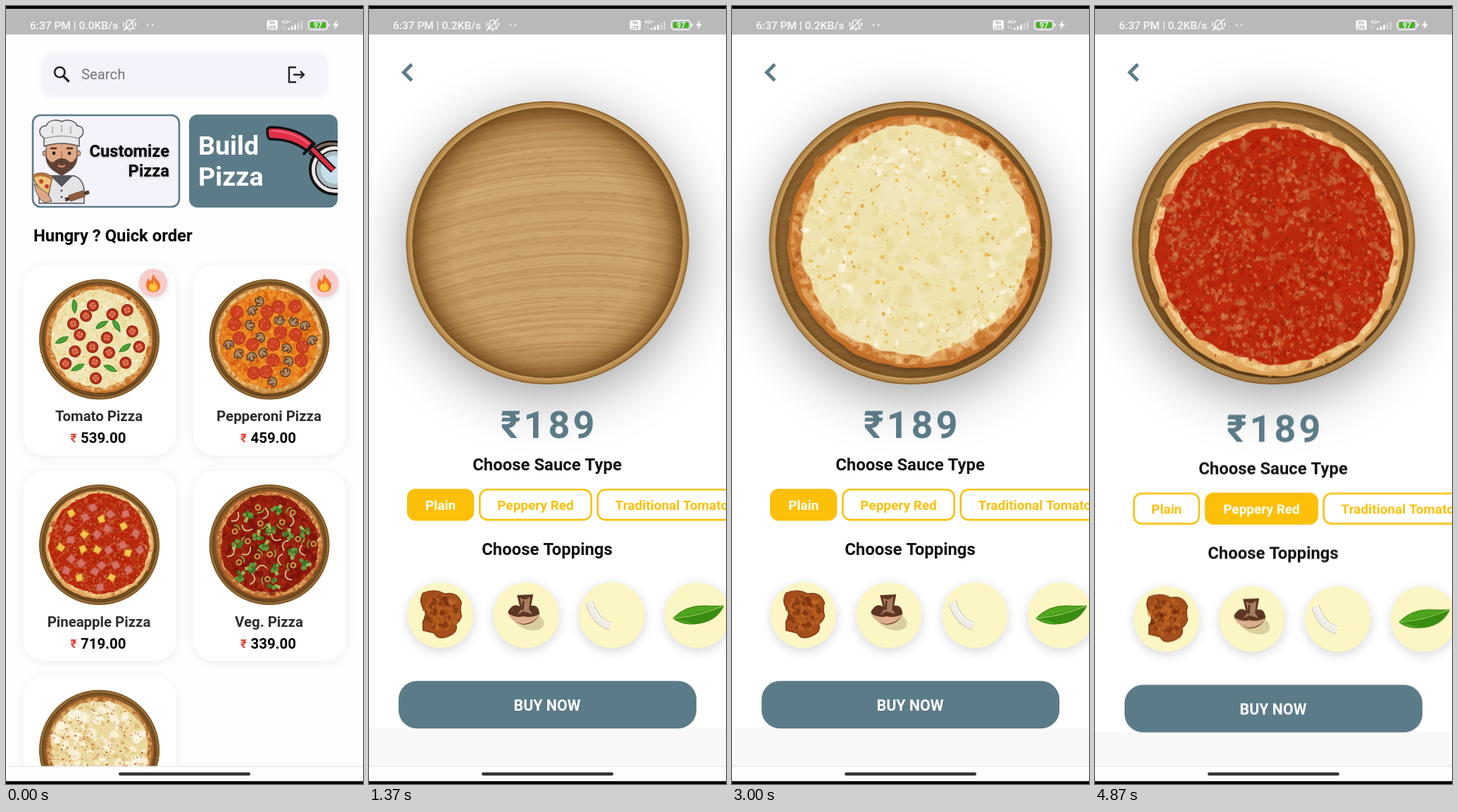
An HTML page with a canvas for the animation above (4990 ms loop, 507 by 1104 pixels).

```html
<!DOCTYPE html>
<html lang="en">
<head>
<meta charset="utf-8">
<style>
html, body { margin: 0; width: 100%; height: 100%; overflow: hidden; background: #000; }
canvas { display: block; }
</style>
</head>
<body>
<canvas id="stage" width="507" height="1104"></canvas>
<script>
const W = 507, H = 1104, LOOP = 4990, STEP = LOOP / 40, TAU = Math.PI * 2;
const SLATE = '#5c7b89', AMBER = '#fcc00a', LILAC = '#f4f3fb';
const stage = document.getElementById('stage').getContext('2d');
let g = stage;

let seed = 7;
const rnd = () => (seed = (seed * 16807) % 2147483647) / 2147483647;
const clamp = v => Math.min(1, Math.max(0, v));

// ---------- drawing helpers ----------
function layer(w, h, draw) {
  const c = document.createElement('canvas'), outer = g;
  c.width = w; c.height = h;
  g = c.getContext('2d');
  draw();
  g = outer;
  return c;
}
function at(x, y, scale, draw) {
  g.save(); g.translate(x, y); g.scale(scale, scale); draw(); g.restore();
}
function paint(fill, stroke, width) {
  if (fill) { g.fillStyle = fill; g.fill(); }
  if (stroke) { g.shadowColor = 'transparent'; g.strokeStyle = stroke; g.lineWidth = width; g.stroke(); }
}
function shaded(color, blur, dy, draw) {
  g.save(); g.shadowColor = color; g.shadowBlur = blur; g.shadowOffsetY = dy; draw(); g.restore();
}
function rect(x, y, w, h, r, fill, stroke, width) {
  g.beginPath(); g.roundRect(x, y, w, h, r); paint(fill, stroke, width);
}
function oval(x, y, rx, ry, fill, stroke, width, turn = 0) {
  g.beginPath(); g.ellipse(x, y, rx, ry, turn, 0, TAU); paint(fill, stroke, width);
}
const disc = (x, y, r, fill, stroke, width) => oval(x, y, r, r, fill, stroke, width);
function shape(d, fill, stroke, width) {
  const p = new Path2D(d);
  if (fill) { g.fillStyle = fill; g.fill(p); }
  if (stroke) { g.strokeStyle = stroke; g.lineWidth = width; g.stroke(p); }
}
function text(s, x, y, size, color, align = 'center', weight = 700, spacing = 0) {
  g.font = `${weight} ${size}px Roboto, sans-serif`;
  g.letterSpacing = spacing + 'px';
  g.textAlign = align; g.fillStyle = color; g.fillText(s, x, y);
}
function blob(x, y, r, wobble, fill) {
  const p = rnd() * 6, q = rnd() * 6;
  g.beginPath();
  for (let a = 0; a < TAU; a += 0.04) {
    const d = r * (1 + wobble * (Math.sin(3 * a + p) + Math.sin(8 * a + q) + 0.6 * Math.sin(17 * a + p) + 0.5 * Math.sin(31 * a)));
    g.lineTo(x + d * Math.cos(a), y + d * Math.sin(a));
  }
  g.closePath(); paint(fill);
}
function specks(n, inner, outer, size, color) {
  for (let i = 0; i < n; i++) {
    const a = rnd() * TAU, d = Math.sqrt(inner * inner + rnd() * (outer * outer - inner * inner));
    const r = size * (0.4 + rnd() * 0.8);
    oval(d * Math.cos(a), d * Math.sin(a), r, r * (0.4 + rnd() * 0.5), color, 0, 0, rnd() * 3);
  }
}
// Even spread over a disc, with a little jitter.
function spread(n, radius, turn, draw) {
  for (let i = 0; i < n; i++) {
    const d = radius * Math.sqrt((i + 0.5) / n), a = i * 2.4 + turn;
    const x = d * Math.cos(a) + rnd() * 6 - 3, y = d * Math.sin(a) + rnd() * 6 - 3;
    g.save(); g.translate(x, y); g.rotate(rnd() * TAU); draw(i); g.restore();
  }
}

// ---------- food ----------
const tray = layer(404, 404, () => {
  g.translate(202, 202);
  g.beginPath(); g.arc(0, 0, 201, 0, TAU); g.clip();
  disc(0, 0, 201, '#c8a069');
  for (let y = -240; y < 250; y += 2.4) {
    const w = rnd() * 10;
    g.globalAlpha = 0.06 + rnd() * 0.22;
    shape(`M-200 ${y + 34}C-90 ${y - 16 + w} 60 ${y - 30 - w} 200 ${y + 8}`,
      0, rnd() < 0.6 ? '#a2743a' : '#dfbd89', 1 + rnd() * 2);
  }
  for (let i = 0; i < 320; i++) {
    const x = rnd() * 380 - 190, y = rnd() * 380 - 190;
    g.globalAlpha = 0.35;
    shape(`M${x} ${y}l${5 + rnd() * 8} -1.5`, 0, '#8f6230', 0.8);
  }
  g.globalAlpha = 1;
  const bevel = g.createRadialGradient(0, 4, 135, 0, 0, 192);
  bevel.addColorStop(0, 'rgba(120,72,16,0)');
  bevel.addColorStop(0.55, 'rgba(115,68,14,.25)');
  bevel.addColorStop(0.9, 'rgba(95,54,10,.62)');
  bevel.addColorStop(1, 'rgba(85,48,8,.75)');
  disc(0, 0, 192, bevel);
  disc(0, 0, 196.5, 0, '#b5884a', 9);
  disc(0, 0, 194, 0, '#c69d60', 2.5);
  disc(0, 0, 200, 0, '#8d6532', 2);
});

function makePizza(crust, toast, base, baseRadius, spots) {
  return layer(404, 404, () => {
    g.translate(202, 202);
    shaded('rgba(40,20,0,.75)', 12, 3, () => blob(0, 0, 180, 0.005, toast));
    blob(1, -1, 175, 0.006, crust);
    specks(190, 160, 176, 8, toast + '99');
    specks(110, 158, 172, 5, '#f3cf9066');
    specks(34, 160, 175, 4.5, '#9c441288');
    blob(0, -2, baseRadius, 0.013, base);
    for (const [n, size, color, inner = 0] of spots) specks(n, inner, baseRadius - 3, size, color);
  });
}
const cheesy = makePizza('#dfa05a', '#c4712b', '#eee2ae', 162, [
  [150, 15, 'rgba(243,234,196,.5)'], [140, 10, 'rgba(230,213,142,.4)'], [60, 6, 'rgba(253,250,236,.6)', 95],
  [230, 2, 'rgba(232,196,90,.55)'], [120, 2.8, 'rgba(236,182,56,.85)'], [70, 2.4, 'rgba(220,145,35,.8)', 90]]);
const flaked = makePizza('#dca562', '#a8662a', '#ebd9a0', 162, [
  [120, 17, 'rgba(252,247,228,.7)'], [90, 9, 'rgba(222,178,100,.5)'],
  [150, 3.5, 'rgba(196,92,36,.75)'], [70, 3, 'rgba(140,44,18,.8)']]);
const peppery = makePizza('#f0cc90', '#dfa45a', '#b8280c', 166, [
  [240, 12, 'rgba(192,44,14,.6)'], [420, 6, 'rgba(196,106,58,.5)'], [620, 3.6, 'rgba(212,142,86,.5)'],
  [420, 5, 'rgba(176,26,6,.65)'], [260, 2.4, 'rgba(226,96,50,.6)'], [260, 2, 'rgba(96,38,16,.6)']]);
const orange = makePizza('#ecc07c', '#c98a3e', '#e27a1d', 165, [
  [170, 14, 'rgba(240,148,40,.6)'], [200, 9, 'rgba(209,78,18,.5)'], [170, 5, 'rgba(247,178,70,.6)']]);
const dark = makePizza('#d99a58', '#b06028', '#97200f', 163, [
  [180, 13, 'rgba(122,18,10,.6)'], [220, 6, 'rgba(190,60,35,.5)']]);

const toppings = {
  tomato(i) {
    if (i % 3 == 2) return shape('M-10 0Q-2 -8 10 0Q0 6 -10 0Z', '#4aa335', '#2f7a22', 1);
    disc(0, 0, 8, '#b3301f', '#8f2416', 1.2);
    disc(0, 0, 5, '#d0583a');
    for (let k = 0; k < 4; k++) disc(3.2 * Math.cos(k * 1.57), 3.2 * Math.sin(k * 1.57), 1, '#eeb070');
  },
  pepperoni(i) {
    if (i % 2) return shape('M-7 1Q-6 -7 1 -7Q8 -6 7 2Q4 3 3 -1L2 5L-3 5L-3 0Q-5 4 -7 1Z', '#b08a66', '#5d3c24', 1.5);
    disc(0, 0, 9, '#cb4020', '#b5331b', 1);
    specks(10, 0, 7, 1.4, '#e2684a');
  },
  pineapple(i) {
    if (i % 3 == 0) return shape('M-5 -4L5 -5L6 3L-2 5Z', '#f0c550', '#d99a26', 1);
    shape('M-6 -5L4 -5L6 4L-4 6Z', '#d27266', '#b9493c', 1);
  },
  veg(i) {
    if (i % 3 == 0) {
      shape('M-2 0L2 0L4 8L-1 9Z', '#9cb95a');
      for (let k = 0; k < 7; k++) disc(rnd() * 13 - 6, rnd() * 8 - 6, 2.8, k % 2 ? '#3f7a2a' : '#649a3c');
    } else if (i % 3 == 1) shape('M-8 3Q0 -9 8 2', 0, '#d8cf9c', 1.7);
    else { disc(0, 0, 3.4, 0, '#bfa447', 2); shape('M5 -8Q10 -3 7 3', 0, '#7fae3c', 1.8); }
  }
};

function chicken() {
  shape('M-25 -31Q-8 -38 6 -30Q24 -34 30 -17Q27 -10 30 2Q27 10 22 13Q26 25 10 31Q-4 36 -9 26L-25 22L-25 9Q-20 4 -22 -6Q-32 -18 -25 -31Z', '#a34e1b', '#7a3512', 1.2);
  g.save(); g.translate(0, -3); specks(60, 0, 25, 5, 'rgba(196,106,36,.5)'); specks(34, 0, 25, 4, 'rgba(105,38,10,.45)'); g.restore();
}
function mushroom() {
  oval(4, 8, 22, 13, 'rgba(120,90,50,.25)', 0, 0, 0.3);
  shape('M-26 -4Q-19 -18 -9 -12L-13 -28L10 -29L7 -13Q18 -15 19 -1Q13 13 -4 14Q-20 11 -26 -4Z', '#5c3524');
  shape('M-26 -2Q-14 5 -4 2Q7 5 19 -1Q13 11 -4 13Q-20 11 -26 -2Z', '#dcae8b');
  shape('M-9 -25Q-3 -18 6 -26L4 -8L9 -1L-4 -5L-13 0L-6 -9Z', '#a87c60');
  shape('M-4 -20L-5 -7', 0, '#5c3524', 3);
}
function onion() {
  shape('M-32 -18Q-24 10 -2 16', 0, '#d5d2c6', 12);
  shape('M-32 -18Q-24 10 -2 16', 0, '#efede5', 9);
  shape('M-29 -18Q-21 7 0 13', 0, '#fbfaf6', 2);
}
function leaf() {
  shape('M-35 5Q-18 -13 8 -13Q28 -12 37 -13Q27 11 -6 13Q-22 14 -35 5Z', '#4fa51d', '#34790f', 1);
  shape('M-35 5Q-15 8 -6 13Q25 12 37 -13Q5 -3 -35 5Z', '#398c12');
  shape('M-35 5Q2 2 37 -13', 0, '#a4cf62', 1.2);
}

// ---------- home screen ----------
function chef() {
  const ink = '#56545a';
  shape('M47 280V262Q48 246 62 241H97Q110 246 111 262V280Z', '#e4e4e7', ink, 1.5);
  shape('M64 241L79 256L94 241Z', '#55575c', ink, 1.2);
  disc(79, 262, 1.6, ink); disc(79, 271, 1.6, ink);
  disc(56, 209, 4, '#d9a27c', ink, 1); disc(102, 209, 4, '#d9a27c', ink, 1);
  shape('M57 194H101V216Q99 233 79 238Q59 233 57 216Z', '#dfa883', ink, 1.2);
  shape('M57 212Q62 224 68 221Q79 211 90 221Q96 224 101 212Q102 229 79 241Q56 229 57 212Z', '#5f4235');
  shape('M74 226Q79 230 84 226', 0, '#d98677', 2.5);
  shape('M63 202h9M86 202h9', 0, '#4b2d22', 2.5);
  disc(68, 209, 2.4, '#2d2220'); disc(90, 209, 2.4, '#2d2220');
  shape('M79 206V215', 0, '#b97d5b', 2);
  shape('M54 187C45 183 46 170 57 170C61 160 74 161 79 164C86 160 98 162 101 170C112 170 112 183 104 187L104 199Q79 191 54 199Z', '#e9e9eb', ink, 1.5);
  shape('M54 188Q79 181 104 188M66 171V181M79 169V179M92 171V181', 0, '#9d9ba1', 1.3);
  shape('M39 240Q50 233 66 242L60 270Q49 263 40 248Z', '#ecc37a', '#8d5a35', 1.5);
  shape('M39 242Q51 236 65 245', 0, '#b57441', 4);
  disc(50, 249, 3, '#c5402c'); disc(58, 256, 3, '#c5402c');
  shape('M40 252Q43 273 55 279L65 277L60 267Z', '#dfa883', ink, 1);
  shape('M84 275L118 264', 0, '#51392d', 5);
  shape('M90 273L111 266', 0, '#8a5c40', 10);
}
function cutter() {
  g.save();
  g.beginPath(); g.roundRect(260, 154, 211, 132, 12); g.clip();
  disc(467, 232, 35, '#ede9e6', '#111', 4);
  disc(467, 232, 27, '#aab9c0', '#222', 2);
  disc(467, 232, 20, '#c5e0ea');
  shape('M433 212Q447 190 474 196', 0, '#111', 8);
  shape('M434 210Q448 191 474 197', 0, '#81675d', 4);
  shape('M424 192L465 233', 0, '#111', 10);
  shape('M424 192L465 233', 0, '#dc3045', 6);
  const grip = 'M371 176Q371 172 378 172Q416 173 438 196L428 206Q407 189 376 189Q371 189 371 176Z';
  shape(grip, '#e22f4a', '#111', 3.5);
  shape('M377 177Q410 178 430 196', 0, '#f36c7f', 2);
  shape('M438 193L422 211', 0, '#111', 4);
  g.restore();
}
function flame(x, y) {
  shaded('rgba(0,0,0,.15)', 8, 2, () => disc(x, y, 20, '#f8cccb'));
  at(x, y, 1, () => {
    shape('M0 -13C2 -6 10 -3 10 4C10 10 5 13 0 13C-6 13 -10 9 -10 3C-10 -1 -8 -4 -7 -7C-5 -5 -5 -3 -4 -2C-1 -5 -2 -9 0 -13Z', '#f4702a');
    shape('M1 -4C2 1 6 2 6 6C6 10 3 12 0 12C-4 12 -6 9 -6 6C-6 3 -4 2 -3 0C-2 2 -1 2 0 2C1 0 0 -2 1 -4Z', '#fdc53a');
  });
}
const menu = [
  ['Tomato Pizza', '539.00', cheesy, 'tomato', 23],
  ['Pepperoni Pizza', '459.00', orange, 'pepperoni', 32],
  ['Pineapple Pizza', '719.00', peppery, 'pineapple', 30],
  ['Veg. Pizza', '339.00', dark, 'veg', 40],
  ['', '', flaked]
];
const home = layer(W, H, () => {
  rect(0, 0, W, H, 0, '#fefefe');
  shaded('rgba(120,110,190,.12)', 10, 1, () => rect(53, 69, 402, 57, 10, LILAC));
  disc(76.3, 94, 7.2, 0, '#222', 2.6);
  shape('M81.5 99.5L89.5 107.5', 0, '#222', 3.2);
  text('Search', 107, 104, 20.3, '#757575', 'left', 400);
  shape('M412 87H402V108H412M408 97.5H423M418 92.5L423 97.5L418 102.5', 0, '#222', 2.4);
  rect(38, 155, 208, 130, 11, LILAC, SLATE, 2.6);
  chef();
  shaded('rgba(0,0,0,.3)', 3, 1, () => {
    text('Customize', 232, 214, 23.7, '#000', 'right');
    text('Pizza', 232, 242, 23.7, '#000', 'right');
  });
  rect(260, 154, 211, 132, 12, SLATE);
  cutter();
  text('Build', 273, 211, 37.6, '#fff', 'left');
  text('Pizza', 273, 255, 37.6, '#fff', 'left');
  text('Hungry ? Quick order', 39, 334, 23.8, '#000', 'left');
  menu.forEach(([name, price, pie, topping, count], i) => {
    const x = i % 2 ? 374 : 132.5, y = 473 + 291.5 * (i >> 1);
    shaded('rgba(0,0,0,.07)', 16, 2, () => rect(x - 108, y - 105, 217, 270, 30, '#fff'));
    at(x, y, 0.425, () => {
      g.drawImage(tray, -202, -202);
      disc(0, 0, 194, 0, 'rgba(95,58,18,.45)', 14);
      g.drawImage(pie, -202, -202);
    });
    if (i < 2) flame(i ? 452 : 209, 393);
    if (!topping) return;
    at(x, y, 1, () => spread(count, 62, i, toppings[topping]));
    text(name, x - 0.5, y + 116, 20.4, '#2d2d2d');
    text('₹', x - 41, y + 146, 17, '#e0402f', 'left');
    text(price, x - 26.5, y + 147, 20.4, '#000', 'left');
  });
});

// ---------- builder screen ----------
const backdrop = layer(W, H, () => {
  rect(0, 0, W, H, 0, '#fff');
  shaded('rgba(0,0,0,.4)', 80, 16, () => disc(253.5, 336, 200, '#cecece'));
  shape('M60.8 82.8L49.3 94.3L60.8 105.8', 0, SLATE, 4.8);
});
function makePanel(selected) {
  return layer(W, H, () => {
    rect(0, 1025, W, 79, 0, '#f8f8f8');
    text('₹189', 187, 613, 54, SLATE, 'left', 700, 4);
    text('Choose Sauce Type', 253, 658.5, 23.9, '#111');
    text('Choose Toppings', 253, 778.5, 23.9, '#111');
    [['Plain', 55.3, 92.6], ['Peppery Red', 157.3, 158.4], ['Traditional Tomato', 324.8, 210]].forEach(([name, x, w], i) => {
      const on = i == selected;
      rect(x, 686.3, w, 42.8, 11, on ? AMBER : '#fff', AMBER, 2.6);
      text(name, x + w / 2, 715, 19, on ? '#fff' : AMBER);
    });
    [chicken, mushroom, onion, leaf].forEach((draw, i) => {
      const x = 101.5 + 121.7 * i;
      shaded('rgba(0,0,0,.16)', 16, 4, () => disc(x, 864.5, 46.5, '#fcf6c4'));
      at(x, 864, 1, draw);
    });
    rect(42, 957.8, 423, 67.4, 26, SLATE);
    text('BUY NOW', 253, 999.5, 21.4, '#fff');
  });
}
const panels = [makePanel(0), makePanel(1)];

const slideIn = u => u < 0 ? 500 : 450 * (1 - clamp(u)) ** 3 * (1 - 2 * clamp(u));
const slideOut = u => 354 * Math.max(0, u) ** 2;
const page = layer(W, H, () => {});

function drawBuilder(t) {
  const swapped = t > 3600;
  g = page.getContext('2d');
  g.drawImage(backdrop, 0, 0);
  g.drawImage(panels[+swapped], 0, swapped ? 5.5 : 0);
  g.globalAlpha = clamp((t - 625) / 500);
  g.drawImage(tray, 51.5, 134);
  g.globalAlpha = 1;
  if (swapped) g.drawImage(peppery, 54 + slideIn((t - 3700) / 800), 142.5);
  else g.drawImage(cheesy, 55 + slideIn((t - 1450) / 800) + slideOut((t - 2960) / 410), 132.5);
  g = stage;
}

// ---------- system bars ----------
function drawBars(t) {
  const ink = '#fafafa', busy = (t > 700 && t < 1200) || (t > 3200 && t < 3600);
  rect(0, 4, W, 36.5, 0, '#b9b9b9');
  text(`6:37 PM | 0.${t > 960 ? 2 : 0}KB/s`, 34, 33, 15.5, ink, 'left', 500);
  shape('M169 32Q171 30 171 25Q171 20 175.5 20Q180 20 180 25Q180 30 182 32ZM174 34.5H178M167 35L184 18M167 23V29M184 23V29', 0, ink, 1.6);
  disc(201, 27, 1.3, ink); disc(208, 27, 1.3, ink);
  rect(370.5, 20, 15.5, 14, 3, ink);
  text('Vo', 378, 26.3, 6.5, '#aaa');
  text('LTE', 378, 32.6, 6.5, '#aaa');
  text('4G+', 391, 24.5, 7.5, ink, 'left', 500);
  g.globalAlpha = busy ? 1 : 0.4;
  shape('M393 33V28.5L391.5 30M396 28V32.5L397.5 31', 0, ink, 1.1);
  for (let i = 0; i < 5; i++) {
    g.globalAlpha = i < 3 ? 1 : 0.45;
    rect(400 + i * 4.6, 31 - i * 2.3, 2.8, 3 + i * 2.3, 1, ink);
  }
  g.globalAlpha = 1;
  rect(429.5, 20.5, 27, 13, 4, 0, ink, 1.5);
  rect(432, 23, 22, 8, 2, '#43b51f');
  text('97', 443, 31, 11, ink);
  rect(458, 25, 1.8, 4, 1, ink);
  shape('M470 20L464 28H468L466 34L473 25.5H469Z', ink);
  rect(0, 1079, W, 21, 0, '#fefefe');
  rect(0, 1078.5, W, 1, 0, '#e2e2e2');
  rect(160, 1087.5, 187, 4.5, 2.2, '#333');
  rect(0, 0, W, 4, 0, '#000');
  rect(0, 1100, W, 4, 0, '#000');
}

function zoomed(image, scale, alpha) {
  const w = W * scale, h = 1079 * scale;
  g.globalAlpha = alpha;
  g.drawImage(image, 0, 0, W, 1079, (W - w) / 2, (1079 - h) / 2, w, h);
  g.globalAlpha = 1;
}
function frame(now) {
  const t = Math.floor((now % LOOP) / STEP + 0.05) % 40 * STEP;
  const p = clamp((t - 520) / 300), open = 1 - (1 - p) ** 3;
  zoomed(home, 1 + 0.05 * open, 1);
  if (p > 0) {
    rect(0, 0, W, 1079, 0, `rgba(0,0,0,${0.6 * clamp(p * 2.4)})`);
    drawBuilder(t);
    zoomed(page, 0.85 + 0.15 * open, clamp(p * 3.5));
  }
  drawBars(t);
  requestAnimationFrame(frame);
}
requestAnimationFrame(frame);
</script>
</body>
</html>
```
